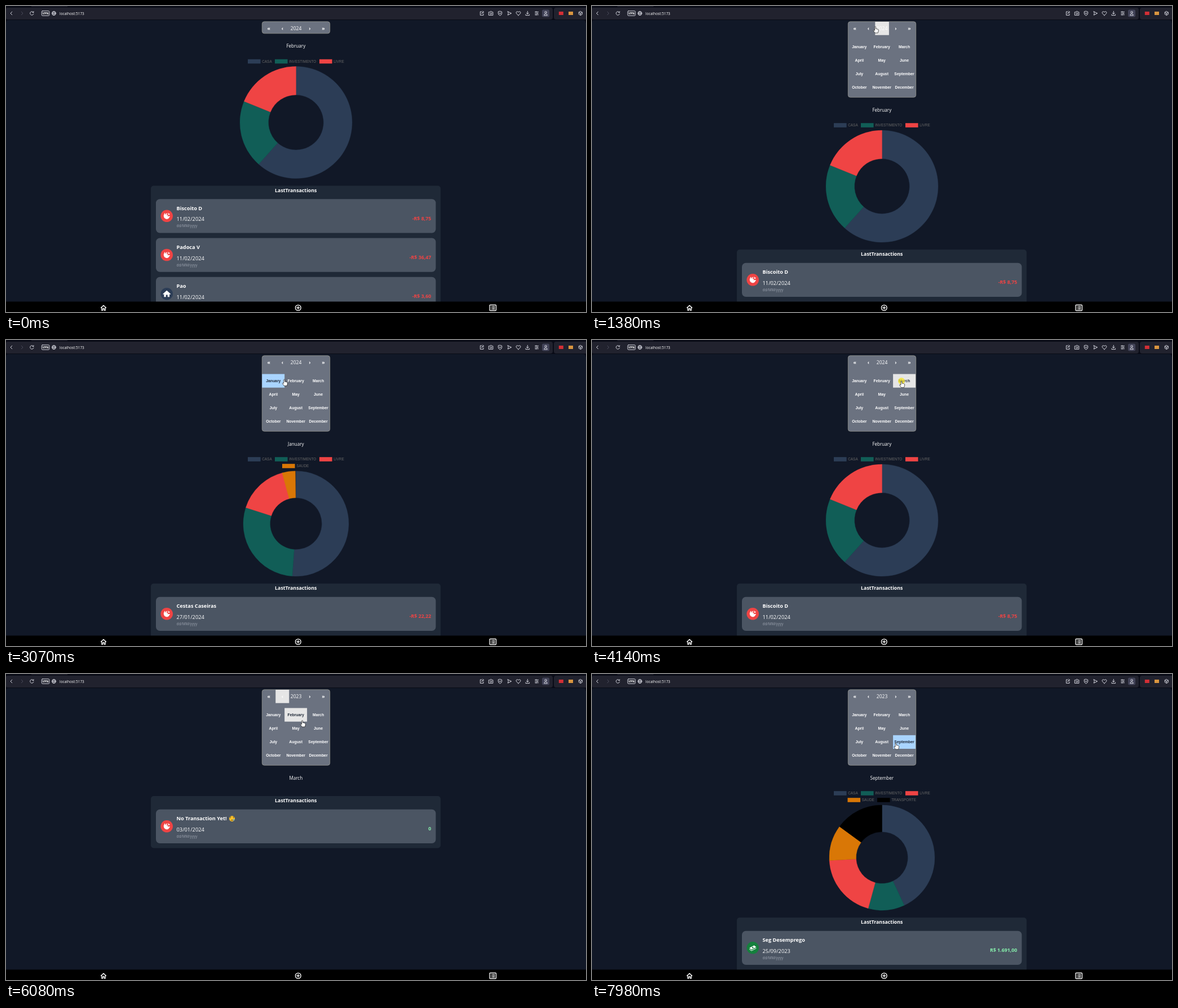
An HTML page that plays this animation: 1029x544 px, repeating every 8 s.

```html
<!DOCTYPE html>
<html lang="en">
<head>
<meta charset="utf-8">
<title>Monthly spending</title>
<style>
  html, body { margin: 0; width: 100%; height: 100%; overflow: hidden; background: #111827; }
  svg { display: block; width: 100%; height: 100%; }
  text { font-family: "Open Sans", "Noto Sans", sans-serif; fill: #fff; white-space: pre; }
  .bold { font-weight: 700; }
  .mid { text-anchor: middle; }
  .end { text-anchor: end; }
  .arial { font-family: "Liberation Sans", sans-serif; }
  .line { fill: none; stroke: #d4d5de; stroke-width: 1; stroke-linecap: round; stroke-linejoin: round; }
  .white { stroke: #fff; stroke-width: 1.3; }
</style>
</head>
<body>
<svg viewBox="0 0 1029 544" preserveAspectRatio="none">
  <rect width="1029" height="544" fill="#111827"/>
  <g id="body"><g id="info"></g><g id="chart"></g></g>
  <g id="panel"></g>

  <rect y="525.5" width="1029" height="19" fill="#000"/>
  <g class="line white">
    <path d="M168.5 536.5l4.5-4.3 4.5 4.3M169.8 535.6v5.4h2v-3h2.4v3h2v-5.4"/>
    <circle cx="518.3" cy="536.5" r="4.9"/><path d="M515.8 536.5h5M518.3 534v5"/>
    <rect x="858" y="531.5" width="11.5" height="10" rx="1"/>
    <path d="M860.5 534.3h.2m2 0h4.3M860.5 536.6h.2m2 0h4.3M860.5 538.9h.2m2 0h4.3"/>
  </g>

  <path fill="#090b16" d="M0 0H1029V30H1028.2Q1028.2 25 1024 25H5Q0 25 0 30Z"/>
  <rect x="45" width="64" height="1.5" fill="#20212d"/>
  <path fill="#21222e" d="M0 6q0-3 3-3H966q4 0 4 4V20q0 4-4 4H3q-3 0-3-3ZM976 3H1029V24H976q-4 0-4-4V7q0-4 4-4Z"/>
  <rect x="951" y="6.5" width="13" height="13" rx="2.5" fill="#414257"/>
  <g class="line">
    <path d="M10.8 10.2L8 13l2.8 2.8"/>
    <path stroke="#4b4c5a" d="M27.3 10.2L30 13l-2.7 2.8"/>
    <path d="M48.6 11.2A3.2 3.2 0 1 0 49 14M49 9.8v1.8h-1.9"/>
    <rect x="63.3" y="8.8" width="13.6" height="8.4" rx="1.6"/>
    <circle cx="85" cy="13" r="3.5"/><ellipse cx="85" cy="13" rx="1.6" ry="3.5"/><path d="M81.6 13h6.8"/>
    <path d="M844 10h-2.6v6.4h5.6v-2.7M843.7 13.9q.2-3 3.6-3.2M845.8 9.2l1.8 1.5-1.6 1.6"/>
    <path d="M856.7 10.8h1.7l.8-1.2h2.2l.8 1.2h1.7v5.6h-7.2z"/><circle cx="860.3" cy="13.4" r="1.5"/>
    <path d="M876.5 9.3l3.2 1v2.7q0 2.5-3.2 4-3.2-1.5-3.2-4v-2.7zM875.4 11.9l2.2 2.2m0-2.2l-2.2 2.2"/>
    <path d="M890.2 9.8l6.4 3.2-6.4 3.2 1-3.2z"/>
    <path d="M909 16.6q-6.2-4.5-2.8-6.6 1.7-.8 2.8 1.1 1.1-1.9 2.8-1.1 3.4 2.1-2.8 6.6z"/>
    <path d="M925.3 9.3v5m-2-2l2 2 2-2M922 15v1.6h6.6V15"/>
    <path d="M938.6 10.4h5.8M938.6 13h5.8M938.6 15.6h5.8M940.5 9.8v1.2m2 1.4v1.2m-2 1.4v1.2"/>
    <circle cx="957.5" cy="11.2" r="1.7"/><path d="M954.7 16.4q0-2.6 2.8-2.6t2.8 2.6z"/>
    <path d="M1019.3 9.6l3 1.7v3.4l-3 1.7-3-1.7v-3.4zM1016.3 11.3l3 1.7 3-1.7M1019.3 13v3.4"/>
  </g>
  <text x="70.1" y="15.1" font-size="5.4" class="bold mid">VPN</text>
  <text x="95" y="15.6" font-size="6.5">localhost:5173</text>
  <rect x="980.8" y="10" width="8" height="6" fill="#d32f35"/>
  <rect x="998" y="10" width="8" height="6" fill="#d9953f"/>

  <circle id="halo" r="6" fill="#f5e52b" opacity=".75"/>
  <g id="cursor" stroke="#111" stroke-width=".7" fill="#fff" stroke-linejoin="round">
    <path id="hand" d="M-1 .6Q0-.6 1 .6V4.2L2.2 4 3.3 4.5 4.5 4.6 5.6 5.6V8.4L4.6 11.4H-.5L-3.2 7.4Q-3.3 6-2 6.3L-1 7.2Z"/>
    <path id="arrow" d="M0 0V9.4L2.2 7.4 3.7 10.8 5.2 10.1 3.7 6.9H6.6Z"/>
  </g>
</svg>
<script>
const LOOP = 8000, OPEN_AT = 985, YEAR_AT = 5500, CX = 514.5;
const $ = id => document.getElementById(id);

const MONTHS = ['January', 'February', 'March', 'April', 'May', 'June', 'July',
  'August', 'September', 'October', 'November', 'December'];
const CATEGORIES = [
  { name: 'CASA', color: '#2c3d56' }, { name: 'INVESTIMENTO', color: '#115e57' },
  { name: 'LIVRE', color: '#ef4444' }, { name: 'SAUDE', color: '#d97706' },
  { name: 'TRANSPORTE', color: '#000' }];
const LEGEND_X = [429, 477, 556];

const ONE_LINE = { cy: 320.5, r: 99.5 }, TWO_LINES = { cy: 326.5, r: 93.5 }, NO_LEGEND = { cy: 314.4, r: 105.7 };
const row = (name, date, amount, icon = 'out') => ({ name, date, amount, icon });

// ends: the angle in degrees at which each slice stops
const VIEWS = [
  { at: -2000, month: 1, ends: [221.7, 292.2, 360], box: ONE_LINE, rows: [
    row('Biscoito D', '11/02/2024', '-R$ 8,75'),
    row('Padoca V', '11/02/2024', '-R$ 36,47'),
    row('Pao', '11/02/2024', '-R$ 3,60', 'home')] },
  { at: 2285, month: 0, ends: [184, 287.8, 345.5, 360], box: TWO_LINES, extraX: [490],
    rows: [row('Cestas Caseiras', '27/01/2024', '-R$ 22,22')] },
  { at: 3200, month: 1, ends: [221.7, 292.2, 360], box: ONE_LINE,
    rows: [row('Biscoito D', '11/02/2024', '-R$ 8,75')] },
  { at: 4200, month: 2, ends: [], box: NO_LEGEND,
    rows: [row('No Transaction Yet!', '03/01/2024', '0')] },
  { at: 6730, month: 8, ends: [155, 195.2, 266.9, 306.3, 360], box: TWO_LINES, extraX: [453.5, 506],
    rows: [row('Seg Desemprego', '25/09/2023', 'R$ 1.691,00', 'cash')] }];

// [time, focused control]
const FOCUS = [[0, ''], [2270, 'm0'], [3160, 'm1'], [4110, 'm2'], [5490, 'n1'], [6650, 'm8']];
const PRESSES = [2280, 3150, 4100, 5480, 6650];

const PATH = [[110, 2, 470], [430, 986, 530], [860, 530, 84], [1000, 514, 40], [1380, 502.5, 36.5],
  [1580, 504, 42], [1650, 505, 56], [1730, 505, 64], [2130, 484, 70], [2900, 484, 70],
  [3070, 493.5, 70], [3150, 510, 72], [3850, 514, 72], [4010, 536, 73], [4100, 549, 73],
  [4660, 549, 73], [5410, 490, 38], [5700, 490, 38], [6080, 525.5, 82.5], [6280, 545, 96],
  [6480, 547, 116], [6640, 542, 120.5], [7170, 542, 120.5], [7980, 539, 122.5]];

const ICONS = {
  out: ['#ef4444', '<path fill="#fff" d="M-5.5-1L-3.8-5-2.7-4.7-2.8-2 .2-5.2 1-4.4-.9-1.3 1.3-2.4Q2.6-1 1.2.4L5.5.2Q6 1.4 4.5 2.4 2.8 6-1 5.5-5.6 4.2-5.5-1Z"/><path fill="#fff" d="M2.7-6l1 2 2.2.5-1.7 1.4-1 .8-.8-2.3Z"/>'],
  home: ['#2c3d56', '<path fill="#fff" d="M0-6L7 .2 6 1.3 4.8.3V5.6H1.5V1.8H-1.5V5.6H-4.8V.3L-6 1.3-7 .2Z"/>'],
  cash: ['#15803d', '<path fill="#fff" d="M-6 .3L2.5-4.2 6.2-1.2-2.3 3.2ZM-6 1.8l3.7 2.9 8.5-4.4v1L-2.3 5.8-6 2.9Z"/><circle r="1.3" cy="-.5" fill="#15803d"/>']
};
const SAD_FACE = `<g transform="translate(401 16.5)"><circle r="5" fill="#fcc42d"/>
  <path class="line" style="stroke:#5b3b12" d="M-2.4-1.2h.1M2.3-1.2h.1M-1.7 2.8q1.7-1.6 3.4 0M-3.4-2.6l1.5-.8M3.4-2.6l-1.5-.8"/>
  <circle cx="3" cy="2" r="1.2" fill="#4aa9e8"/></g>`;

const text = (x, y, size, str, cls = '', fill = '#fff') =>
  `<text x="${x}" y="${y}" font-size="${size}" class="${cls}" style="fill:${fill}">${str}</text>`;

function legend(view) {
  return view.ends.map((_, i) => {
    const x = i < 3 ? LEGEND_X[i] : view.extraX[i - 3], y = i < 3 ? 212 : 224;
    return `<rect x="${x}" y="${y - 3.8}" width="22.6" height="7.6" fill="${CATEGORIES[i].color}"/>` +
      text(x + 25.2, y + 2.2, 6.43, CATEGORIES[i].name, 'arial', '#666');
  }).join('');
}

function transaction({ name, date, amount, icon }, y) {
  const [color, glyph] = ICONS[icon];
  const tone = amount[0] === '-' ? '#ef4444' : '#86efac';
  return `<g transform="translate(0 ${y})">
    <rect x="266" width="496.5" height="60.3" rx="7" fill="#4b5563"/>
    <g transform="translate(285.2 30)"><circle r="10.8" fill="${color}"/>${glyph}</g>
    ${text(302.5, 19.3, 9.2, name, 'bold')}${text(302.5, 39, 9.3, date)}
    ${text(302.5, 50, 6.4, 'dd/MM/yyyy', '', '#9ca3af')}
    ${text(754.3, 37.5, 8.8, amount, 'bold end', tone)}${amount === '0' ? SAD_FACE : ''}</g>`;
}

function info(view) {
  const top = view.ends.length ? 433 : 217;
  const height = view.ends.length ? 300 : 92.5;
  return text(514.3, 187.5, 8.1, MONTHS[view.month], 'mid') + legend(view) +
    `<rect x="257" y="${top}" width="514" height="${height}" rx="5" fill="#1f2937"/>` +
    text(514.3, top + 11, 8.8, 'LastTransactions', 'bold mid') +
    view.rows.map((r, i) => transaction(r, top + 23.8 + i * 69.2)).join('');
}

function panel(open, year, hover, focus, active) {
  const cell = (key, x, y, w, h, label, size, cls, dark) => {
    const lit = key === hover || key === focus;
    const fill = !lit ? 'none' : key === active ? '#a9d4ff' : '#e6e6e6';
    return `<rect x="${x}" y="${y}" width="${w}" height="${h}" fill="${fill}"/>` +
      text(x + w / 2, y + h / 2 + size * .36, size, label, 'mid ' + cls, lit && dark ? '#1f2937' : '#fff');
  };
  const nav = ['«', '‹', year, '›', '»'].map((label, i) =>
    cell('n' + i, 454.3 + i * 24 + (i > 2 ? .6 : 0), 28, i === 2 ? 24.6 : 24, 23.7, label, i === 2 ? 8.5 : 8.8, i === 2 ? '' : 'bold'));
  const months = MONTHS.map((label, i) =>
    cell('m' + i, 454.3 + i % 3 * 39.9, 60.5 + Math.floor(i / 3) * 24.15, 39.9, 24.15, label, 6.85, 'arial bold', true));
  return `<rect x="454.3" y="27.8" width="120.4" height="${open ? 134.5 : 21}" rx="4" fill="#6b7280" stroke="#a0a096" stroke-width=".7"/>` +
    nav.join('') + (open ? months.join('') : '');
}

const point = (cy, r, deg) => {
  const a = (deg - 90) * Math.PI / 180;
  return `${(CX + r * Math.cos(a)).toFixed(2)} ${(cy + r * Math.sin(a)).toFixed(2)}`;
};

function slice(cy, r, from, to, color) {
  const inner = r * .492, big = to - from > 180 ? 1 : 0;
  return `<path fill="${color}" stroke="${color}" stroke-width=".4" d="M${point(cy, r, from)}A${r} ${r} 0 ${big} 1 ${point(cy, r, to)}` +
    `L${point(cy, inner, to)}A${inner} ${inner} 0 ${big} 0 ${point(cy, inner, from)}Z"/>`;
}

const mix = (a, b, p) => a + (b - a) * p;

function chart(view, before, t) {
  const p = 1 - (1 - Math.min(1, (t - view.at) / 1000)) ** 4;
  const cy = mix(before.box.cy, view.box.cy, p), r = mix(before.box.r, view.box.r, p);
  const old = before.ends;
  return view.ends.map((end, i) => {
    const known = i < old.length;
    const from = mix(known && i ? old[i - 1] : 0, i ? view.ends[i - 1] : 0, p);
    return slice(cy, r, from, mix(known ? old[i] : 0, end, p), CATEGORIES[i].color);
  }).join('');
}

function cursorAt(t) {
  const i = PATH.findIndex(k => k[0] > t);
  if (i < 0) return PATH[PATH.length - 1].slice(1);
  const [a, b] = [PATH[Math.max(0, i - 1)], PATH[i]];
  const p = i ? (t - a[0]) / (b[0] - a[0]) : 0;
  return [mix(a[1], b[1], p), mix(a[2], b[2], p)];
}

function hoverAt(x, y, open) {
  if (x < 454.3 || x > 574.7 || y < 28) return '';
  if (y < 51.7) return 'n' + (x < 478.3 ? 0 : x < 502.3 ? 1 : x < 526.9 ? 2 : x < 550.9 ? 3 : 4);
  if (!open || y < 60.5 || y > 157) return '';
  return 'm' + (Math.floor((y - 60.5) / 24.15) * 3 + Math.min(2, Math.floor((x - 454.3) / 39.9)));
}

const cache = {};
function put(id, html) {
  if (cache[id] !== html) $(id).innerHTML = cache[id] = html;
}

function draw(t) {
  const index = VIEWS.findLastIndex(v => v.at <= t);
  const view = VIEWS[index], before = VIEWS[Math.max(0, index - 1)];
  const open = t >= OPEN_AT, year = t < YEAR_AT ? 2024 : 2023;
  const [x, y] = cursorAt(t);
  const hover = t < PATH[0][0] ? '' : hoverAt(x, y, open);
  const focus = FOCUS.findLast(f => f[0] <= t)[1];
  const shownYear = view.month === 8 ? 2023 : 2024;

  $('body').setAttribute('transform', `translate(0 ${open ? 0 : -113.5})`);
  put('info', info(view));
  put('chart', chart(view, before, t));
  put('panel', panel(open, year, hover, focus, year === shownYear ? 'm' + view.month : ''));

  const at = `translate(${x.toFixed(2)} ${y.toFixed(2)})`;
  $('cursor').setAttribute('transform', at);
  $('cursor').style.display = t < PATH[0][0] ? 'none' : '';
  $('hand').style.display = hover ? '' : 'none';
  $('arrow').style.display = hover ? 'none' : '';
  $('halo').setAttribute('transform', at);
  $('halo').style.display = PRESSES.some(p => t >= p && t < p + 90) ? '' : 'none';
}

const start = performance.now();
function tick() {
  draw((performance.now() - start) % LOOP);
  requestAnimationFrame(tick);
}
tick();
</script>
</body>
</html>
```
